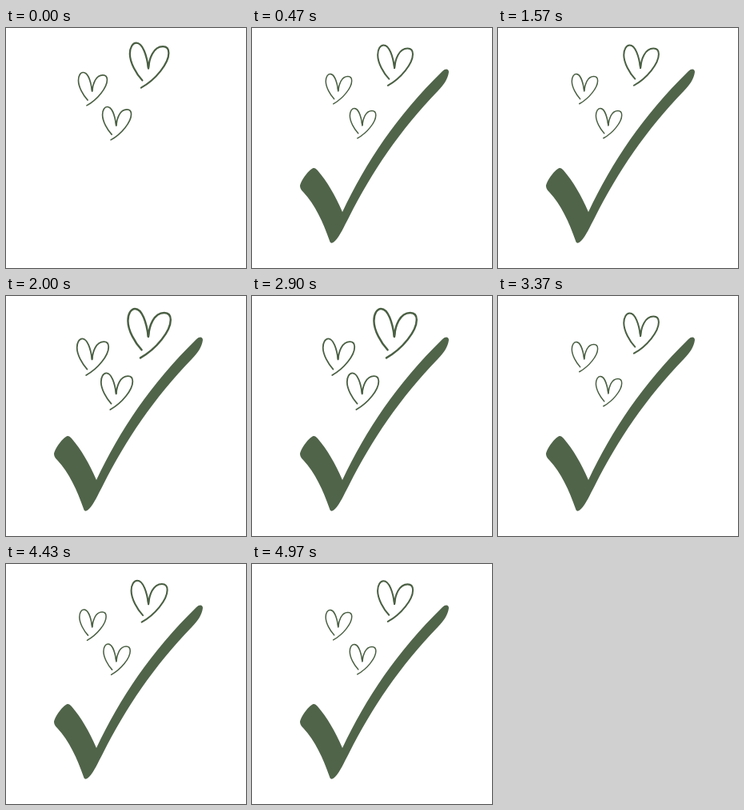
Write an HTML page with a canvas that moves like this. It is 300 px wide and 300 px high and loops after 5010 ms.

```html
<!DOCTYPE html>
<html lang="en">
<head>
<meta charset="utf-8">
<title>Check and hearts</title>
<style>
  html, body { margin: 0; width: 100%; height: 100%; overflow: hidden; background: #fff; }
  canvas { display: block; width: 300px; height: 300px; }
</style>
</head>
<body>
<canvas id="stage"></canvas>
<script>
const LOOP = 5010;
const BEAT = 900;
const PEAK = 150;
const WIPE = 450;
const GREEN = '#50644a';
const LINE = '#4a5f43';

const canvas = document.getElementById('stage');
const ctx = canvas.getContext('2d');
const ratio = window.devicePixelRatio || 1;
canvas.width = canvas.height = 300 * ratio;

const check = new Path2D(
  'M77 175 C72 176 62 189 60 197 C60 200 61 202 64 205 ' +
  'C79 221 89 243 97 266 C98 270 101 269 104 266 ' +
  'C110 260 115 248 121 237 C151 178 184 129 233 78 ' +
  'C240 71 245 63 246 55 C246 51 242 50 238 54 ' +
  'C180 111 143 167 113 230 C104 209 94 192 82 178 C80 176 79 175 77 175 Z');

const heart = new Path2D(
  'M-8.5 19 C-16 11 -24 -3 -24 -14 C-24 -22 -20.5 -27.5 -16 -27.5 ' +
  'C-8 -27.5 -3 -12 -1 4 C0 -8 5 -23 17 -23 ' +
  'C22 -23 24.2 -20 24.2 -15 C24.2 -2 8 18 -10 28');
const notch = new Path2D('M-1.6 -2 L-1 4 L-0.4 -2');

const hearts = [
  { x: 179, y: 46.4, size: 1 },
  { x: 108.4, y: 76, size: 0.74 },
  { x: 138.5, y: 119, size: 0.74 }
];

function pulse(t) {
  const wave = 0.5 + 0.5 * Math.cos(2 * Math.PI * (t - PEAK) / BEAT);
  return 0.905 + 0.205 * Math.pow(wave, 2.4);
}

function drawCheck(t) {
  const p = Math.min(t / WIPE, 1);
  const eased = 1 - (1 - p) * (1 - p);
  ctx.save();
  ctx.beginPath();
  ctx.rect(58, 0, 190 * eased, 300);
  ctx.clip();
  ctx.fillStyle = GREEN;
  ctx.fill(check);
  ctx.restore();
}

function drawHeart({ x, y, size }, scale) {
  ctx.save();
  ctx.translate(x, y);
  ctx.scale(size * scale, size * scale);
  ctx.strokeStyle = LINE;
  ctx.lineCap = ctx.lineJoin = 'round';
  ctx.lineWidth = 2.2;
  ctx.stroke(heart);
  ctx.stroke(notch);
  ctx.restore();
}

function draw(t) {
  ctx.setTransform(ratio, 0, 0, ratio, 0, 0);
  ctx.fillStyle = '#fff';
  ctx.fillRect(0, 0, 300, 300);
  drawCheck(t);
  const scale = pulse(t);
  hearts.forEach(h => drawHeart(h, scale));
}

const start = performance.now();
function tick() {
  const t = (performance.now() - start) % LOOP;
  // The picture advances 150 times per loop.
  const step = LOOP / 150;
  draw(Math.floor(t / step) * step);
  requestAnimationFrame(tick);
}
tick();
</script>
</body>
</html>
```
